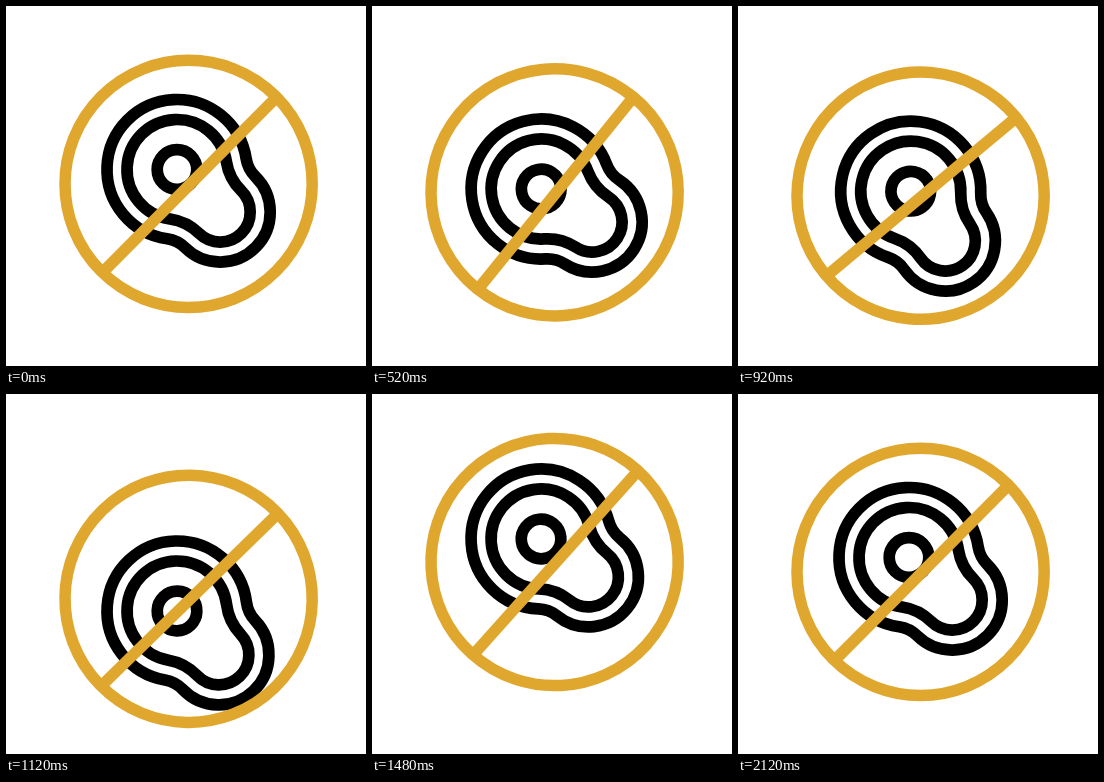
An HTML page for the animation above (2.4 s loop, 360 by 360 pixels).

```html
<!DOCTYPE html>
<html lang="en">
<head>
<meta charset="utf-8">
<title>Bouncing sign</title>
<style>
  html, body { margin: 0; width: 100%; height: 100%; overflow: hidden; background: #fff; }
  svg { display: block; width: 100vw; height: 100vh; }
</style>
</head>
<body>
<svg viewBox="0 0 360 360" fill="none" stroke-width="11.7">
  <g id="sign">
    <g id="shape" stroke="#000">
      <g transform="translate(171 163.5) rotate(44.6)">
        <path id="outer"/>
        <path id="inner"/>
        <circle r="19.8"/>
      </g>
    </g>
    <g stroke="#e0a72e" stroke-width="11.5" transform="translate(182.6 177.9)">
      <circle r="123.6"/>
      <path d="M-122 1.3H122" transform="rotate(-45.2)"/>
    </g>
  </g>
</svg>
<script>
const LOOP = 2400;
const PIVOT = "182.6 177.9";
const LOBE_X = 60.6;

// [time in ms, value]
const DROP = [[0, 0], [360, 30], [715, -20.5], [1060, 30], [1420, -11.5], [1770, 9], [2120, 0]];
const TILT = [[0, 0], [360, -15.8], [715, 7.6], [1420, -3.4], [1770, 2.4], [2120, 0]];

const $ = id => document.getElementById(id);

// Two circles of different size, joined by concave fillets.
function pearPath(head, lobe, fillet) {
  const a = head + fillet, b = lobe + fillet;
  const cx = (LOBE_X ** 2 + a * a - b * b) / (2 * LOBE_X);
  const cy = Math.sqrt(a * a - cx * cx);
  const hx = cx * head / a, hy = cy * head / a;
  const lx = LOBE_X + (cx - LOBE_X) * lobe / b, ly = cy * lobe / b;
  return `M${hx} ${-hy}A${fillet} ${fillet} 0 0 0 ${lx} ${-ly}` +
    `A${lobe} ${lobe} 0 1 1 ${lx} ${ly}` +
    `A${fillet} ${fillet} 0 0 0 ${hx} ${hy}` +
    `A${head} ${head} 0 1 1 ${hx} ${-hy}Z`;
}

function valueAt(keys, t) {
  const i = keys.findIndex(key => key[0] > t);
  if (i < 0) return keys[keys.length - 1][1];
  const [t0, v0] = keys[i - 1], [t1, v1] = keys[i];
  const u = (t - t0) / (t1 - t0);
  return v0 + (v1 - v0) * u * u * (3 - 2 * u);
}

// The shape inherits the sign's motion and repeats it.
function draw(t) {
  const move = `translate(0 ${valueAt(DROP, t)}) rotate(${valueAt(TILT, t)} ${PIVOT})`;
  $("sign").setAttribute("transform", move);
  $("shape").setAttribute("transform", move);
}

$("outer").setAttribute("d", pearPath(70, 50, 32));
$("inner").setAttribute("d", pearPath(50, 30, 52));

let start;
function tick(now) {
  start ??= now;
  draw((now - start) % LOOP);
  requestAnimationFrame(tick);
}
draw(0);
requestAnimationFrame(tick);
</script>
</body>
</html>
```
